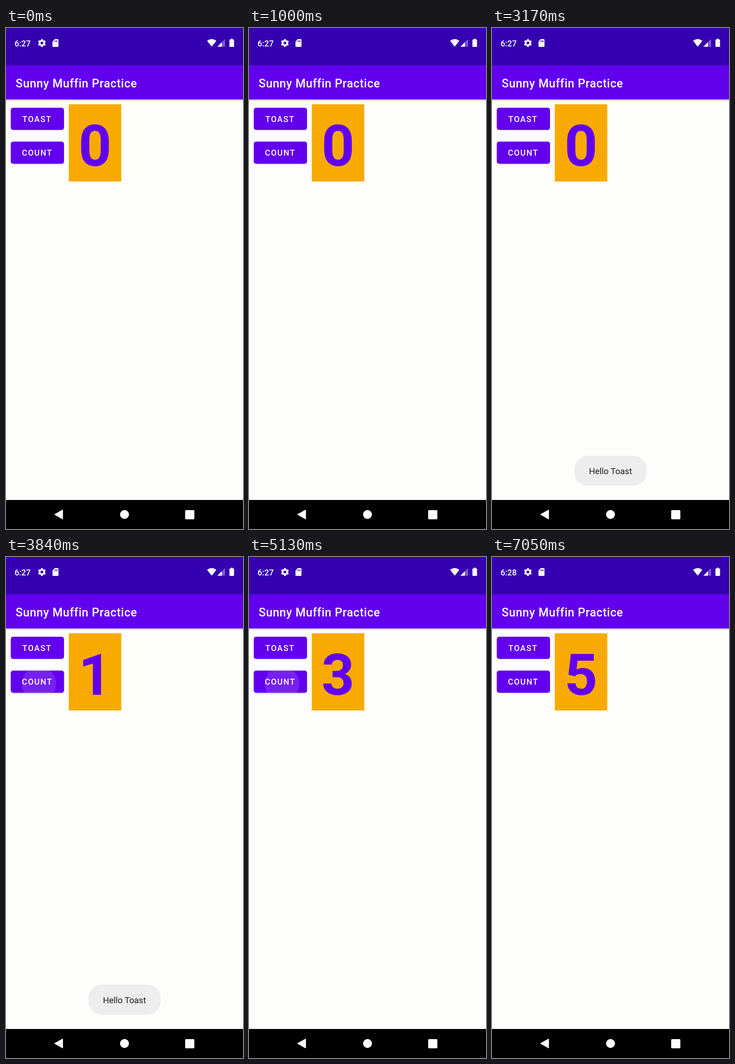
Recreate the animation shown at these times as an HTML page. Size 515 px wide and 1087 px high, loop 7.18 s.

```html
<!DOCTYPE html>
<html lang="en">
<head>
<meta charset="utf-8">
<title>Toast and counter</title>
<style>
  html, body { margin: 0; height: 100%; overflow: hidden; background: #fdfdfc; }
  svg { display: block; width: 100vw; height: 100vh; font-family: Roboto, sans-serif; }
  .label { font-size: 17.7px; font-weight: 500; letter-spacing: 1.65px; fill: #fff; }
  .button { fill: #6200ee; }
</style>
</head>
<body>
<svg viewBox="0 0 515 1087">
  <defs>
    <linearGradient id="shade" x2="0" y2="1">
      <stop stop-color="#000" stop-opacity=".2"/>
      <stop offset="1" stop-color="#000" stop-opacity="0"/>
    </linearGradient>
    <clipPath id="inside">
      <rect x="10.5" y="173" width="115.5" height="48" rx="5"/>
      <rect x="10.5" y="246.5" width="115.5" height="48" rx="5"/>
    </clipPath>
  </defs>

  <rect width="515" height="1087" fill="#fdfdfc"/>
  <rect y="155" width="515" height="5" fill="url(#shade)"/>
  <rect width="515" height="82" fill="#3600b0"/>
  <rect y="81" width="515" height="74" fill="#6200ee"/>

  <!-- status bar -->
  <g fill="#fff">
    <text id="clock" x="18.5" y="39.5" font-size="17.8" font-weight="500"></text>
    <g transform="translate(78 32.5)" fill="none" stroke="#fff">
      <circle r="4.9" stroke-width="3.8"/>
      <circle r="7.4" stroke-width="2.4" stroke-dasharray="4 3.75" transform="rotate(14.5)"/>
    </g>
    <path d="M106 24h6.5q1.5 0 1.5 1.5v14q0 1.5-1.5 1.5h-10q-1.5 0-1.5-1.5v-10z"/>
    <path d="M106 27v3.5M108.7 27v3.5M111.3 27v3.5" stroke="#3600b0" stroke-width="1.4"/>
    <path d="M437 28Q447 20 457 28L447 40.5z"/>
    <path d="M476 24v16.5h-16.5z" opacity=".35"/>
    <path d="M469 31v9.5h-9.5z"/>
    <path d="M488.5 25v-1.8h4V25h2q1 0 1 1v14q0 1-1 1h-8q-1 0-1-1V26q0-1 1-1z"/>
  </g>
  <text x="21" y="128.7" font-size="25.3" font-weight="500" letter-spacing=".65" fill="#fff">Sunny Muffin Practice</text>

  <!-- buttons -->
  <rect class="button" x="10.5" y="173" width="115.5" height="48" rx="5"/>
  <rect class="button" x="10.5" y="246.5" width="115.5" height="48" rx="5"/>
  <g clip-path="url(#inside)"><circle id="ripple" fill="#fff"/></g>
  <text class="label" x="35.5" y="204">TOAST</text>
  <text class="label" x="34.5" y="277.3">COUNT</text>

  <!-- counter -->
  <rect x="136.5" y="165.5" width="114" height="167.5" fill="#f8aa00"/>
  <text id="count" x="193.5" y="298.5" font-size="125.2" font-weight="700" text-anchor="middle" fill="#6200ee"></text>

  <g id="toast">
    <rect x="179" y="928" width="157" height="65" rx="29" fill="#ededee"/>
    <text x="257.5" y="968" font-size="18.6" text-anchor="middle" fill="#1b1b1b">Hello Toast</text>
  </g>

  <!-- navigation bar -->
  <rect y="1024" width="515" height="63" fill="#000"/>
  <g fill="#fff">
    <path d="M106 1055.5L123 1046v19z" stroke="#fff" stroke-width="1.5" stroke-linejoin="round"/>
    <circle cx="257.5" cy="1055.5" r="9.7"/>
    <rect x="389.3" y="1046" width="20" height="20" rx="2"/>
  </g>
</svg>
<script>
const LOOP = 7180, HOLD = 230, FADE = 180;
const presses = [
  { at: 1700, button: 0 },
  ...[3190, 3800, 4445, 5090, 5735].map(at => ({ at, button: 1 }))
];
const el = id => document.getElementById(id);
const [clock, ripple, count, toast] = ['clock', 'ripple', 'count', 'toast'].map(el);
const buttons = document.querySelectorAll('.button');
const ramp = (t, start, length) => Math.min(1, Math.max(0, (t - start) / length));
const mix = (a, b, k) => a + (b - a) * k;

// cubic-bezier(.4, 0, .2, 1)
function ease(x) {
  let lo = 0, hi = 1, u = 0;
  for (let i = 0; i < 20; i++) {
    u = (lo + hi) / 2;
    const bx = 1.2 * u * (1 - u) ** 2 + .6 * u * u * (1 - u) + u ** 3;
    if (bx < x) lo = u; else hi = u;
  }
  return u * u * (3 - 2 * u);
}

function drawPress(t) {
  const press = presses.filter(p => p.at <= t).pop();
  const age = press ? t - press.at : LOOP;
  const grow = ease(ramp(age, 0, 225));
  const fade = 1 - ramp(age, HOLD, FADE);
  const row = press ? press.button : 0;
  ripple.setAttribute('cx', mix(72, 68.3, grow));
  ripple.setAttribute('cy', mix(202.5, 197, grow) + row * 73.5);
  ripple.setAttribute('r', mix(34.6, 62.6, grow));
  ripple.setAttribute('opacity', .235 * ramp(age, 0, 75) * fade);
  buttons.forEach((b, i) => {
    const lift = press && i === row ? ramp(age, 0, 100) * fade : 0;
    b.style.filter = `drop-shadow(0 ${mix(1, 3, lift)}px ${mix(1.2, 3.5, lift)}px rgba(0,0,0,${mix(.22, .32, lift)}))`;
  });
}

function draw(now) {
  const t = now % LOOP;
  clock.textContent = t < 5200 ? '6:27' : '6:28';
  count.textContent = presses.filter(p => p.button && t >= p.at + HOLD).length;
  toast.setAttribute('opacity', ramp(t, 1960, 200) * (1 - ramp(t, 4130, 200)));
  drawPress(t);
}

const start = performance.now();
function tick() {
  draw(performance.now() - start);
  requestAnimationFrame(tick);
}
tick();
</script>
</body>
</html>
```
